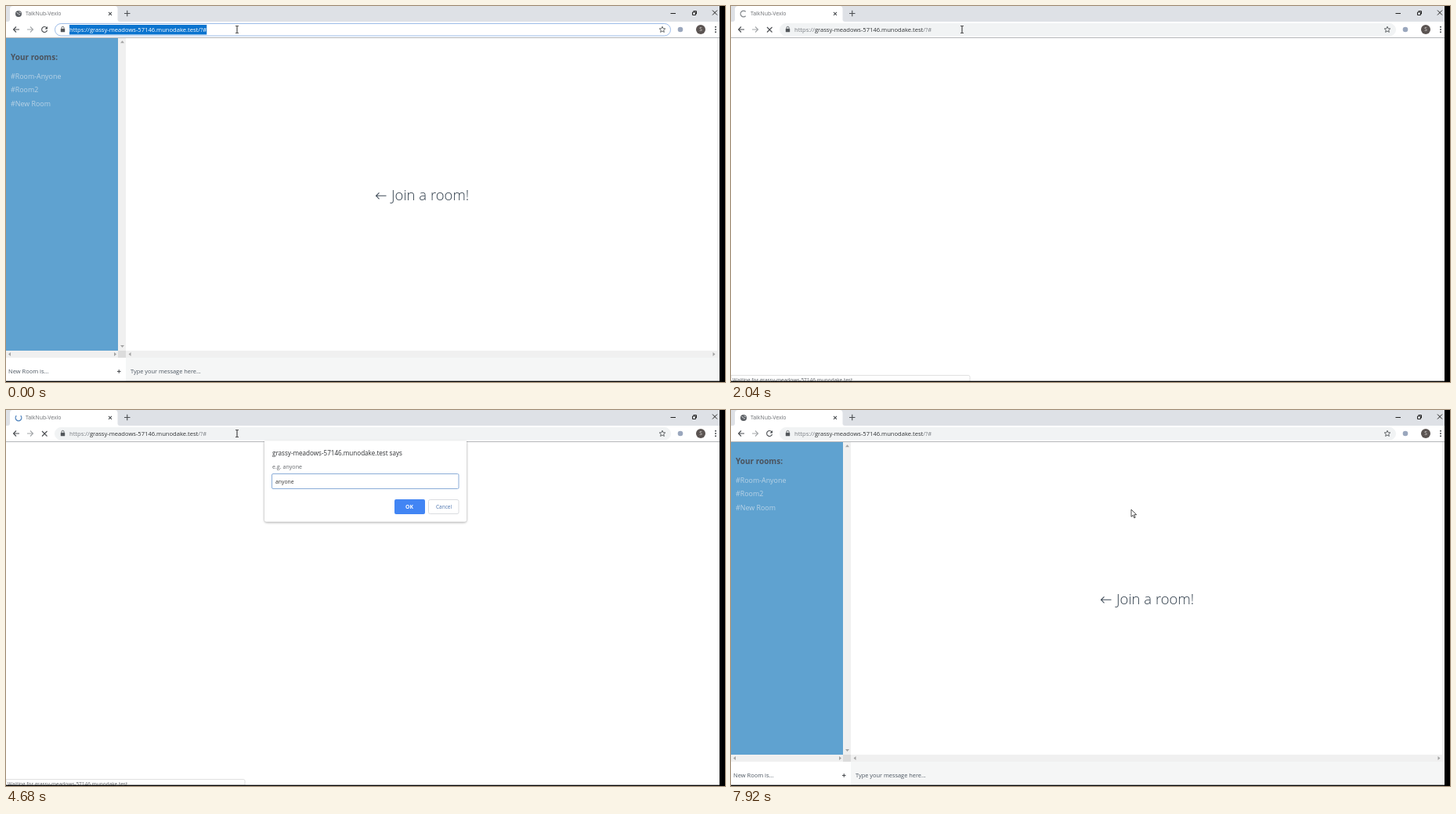
Recreate the animation shown at these times as an HTML page. Size 918 by 480 pixels, loop 8 s.

```html
<!DOCTYPE html>
<html lang="en">
<head>
<meta charset="utf-8">
<title>Chat room</title>
<style>
  html, body { margin: 0; width: 100%; height: 100%; overflow: hidden; background: #fff; }
  svg { display: block; width: 918px; height: 480px; }
  text { font-family: "Open Sans", "Noto Sans", sans-serif; white-space: pre; }
  .line { fill: none; stroke: #4b4e52; stroke-width: 1.1; }
  .thin { fill: none; stroke: #222; stroke-width: 1; }
</style>
</head>
<body>
<svg viewBox="0 0 918 480" xmlns="http://www.w3.org/2000/svg">
  <defs>
    <filter id="shade" x="-10%" y="-10%" width="120%" height="130%">
      <feDropShadow dx="0" dy="1" stdDeviation="1.5" flood-color="#000" flood-opacity=".4"/>
    </filter>
  </defs>
  <rect width="918" height="480" fill="#fff"/>

  <g id="page">
    <rect y="41" width="143" height="399" fill="#5fa2d0"/>
    <text x="6" y="69" font-size="10" font-weight="700" fill="#4b535e">Your rooms:</text>
    <g id="rooms" font-size="8.9" font-weight="500" fill="#b9d3e6">
      <text x="6" y="92.5">#Room-Anyone</text>
      <text x="6" y="110.3">#Room2</text>
      <text x="6" y="128.2">#New Room</text>
    </g>
    <rect x="143" y="41" width="10" height="399" fill="#f0f0f0"/>
    <rect y="440" width="911" height="9" fill="#f0f0f0"/>
    <rect x="143" y="440" width="10" height="9" fill="#dcdcdc"/>
    <rect x="908" y="41" width="3" height="408" fill="#f0f0f0"/>
    <path fill="#a3a3a3" d="M146 47.3h5l-2.5-3zM146 433h5l-2.5 3zM6 442v5l-3-2.500zM138 442v5l3-2.500zM159.500 442v5l-3-2.500zM902.500 442v5l3-2.500z"/>
    <rect x="153" y="449" width="758" height="30" fill="#f5f6f6"/>
    <text x="3" y="469" font-size="7.5" fill="#4c5661">New Room is...</text>
    <path class="line" d="M142 466.500h4.500M144.250 464.200v4.600" stroke-width=".9"/>
    <text x="159" y="469" font-size="7.4" fill="#4c5661">Type your message here...</text>
    <path class="line" d="M485.500 242.300H472.500M476.500 238.300l-4 4 4 4" style="stroke:#3f4b58"/>
    <text x="492" y="248" font-size="18.5" font-weight="300" fill="#33404d">Join a room!</text>
  </g>

  <g id="status">
    <path d="M0 471.500H303q2 0 2 2V479H0z" fill="#fff" stroke="#d8d8d8" stroke-width=".8"/>
    <text class="wait" x="2" y="480" font-size="6.5" fill="#62666b"></text>
  </g>

  <rect width="911" height="20" fill="#dee1e6"/>
  <path d="M2 20q3 0 3-3V4q0-4 4-4H139q3.500 0 3.500 4V17q0 3 3 3z" fill="#fff"/>
  <rect y="20" width="911" height="20" fill="#fff"/>
  <rect y="40" width="911" height="1" fill="#b4b6b9"/>
  <g id="globe">
    <circle cx="16" cy="10" r="4" fill="#5a5e63"/>
    <path d="M13.500 8.500q2 .2 2.500 2t2-.3M16.500 7q.5 1.500 2.500 1.500" fill="none" stroke="#e2e4e6" stroke-width=".9"/>
  </g>
  <path id="spin" d="M16 6.200A3.800 3.800 0 1 1 12.200 10" fill="none" stroke-width="1.300"/>
  <text x="25" y="12.400" font-size="6.900" fill="#6a6d71">TalkNub-Vexlo</text>
  <path class="line" d="M131 7.800l4 4M135 7.800l-4 4"/>
  <path class="line" d="M151 9.500h7.500M154.750 5.800v7.500"/>
  <path class="thin" d="M848.500 9.500h6.500M876.500 8v3.500h4V8zM877.800 7.500V6.500h3.700v3.500h-1M902 5.500l6 6M908 5.500l-6 6"/>

  <path class="line" d="M17 30H9.500M13 26.500L9.500 30l3.500 3.500"/>
  <path class="line" d="M27 30h7.500M31 26.500l3.500 3.500-3.500 3.500" style="stroke:#a4a7aa"/>
  <g id="reload">
    <path class="line" d="M52 28A3.500 3.500 0 1 0 52.500 31"/>
    <path d="M53 26v3.500h-3.500z" fill="#4b4e52"/>
  </g>
  <path id="stop" class="line" d="M46 27l6.500 6.500M52.500 27L46 33.500"/>
  <rect id="bar" x="62.500" y="22.500" width="786" height="15.500" rx="7.700"/>
  <rect x="69.800" y="29" width="5.400" height="4.300" rx=".5" fill="#53575b"/>
  <path d="M71 29v-1.200q0-1.500 1.500-1.500t1.500 1.500V29" fill="none" stroke="#53575b" stroke-width=".9"/>
  <rect id="mark" x="81" y="24" height="12.500" fill="#0b74cf"/>
  <text id="url" x="81" y="32.700" font-size="7.600"><tspan></tspan><tspan></tspan><tspan></tspan></text>
  <path id="star" fill="none" stroke="#53575b" stroke-width=".9"/>
  <circle cx="861" cy="30" r="3.300" fill="#9aa7bd"/>
  <circle cx="887" cy="30" r="6" fill="#5b5452"/>
  <text x="887" y="32.400" font-size="6.500" text-anchor="middle" fill="#e4e0dd">S</text>
  <g fill="#4b4e52"><circle cx="906" cy="26.800" r="1"/><circle cx="906" cy="30" r="1"/><circle cx="906" cy="33.200" r="1"/></g>

  <g id="dialog">
    <path d="M330 39.500H588V139.500q0 3-3 3H333q-3 0-3-3z" fill="#fff" filter="url(#shade)"/>
    <text class="says" x="340" y="58.300" font-size="8.100" fill="#303235"></text>
    <text x="340" y="74.500" font-size="7.100" fill="#65686c">e.g. anyone</text>
    <rect x="339.500" y="81.500" width="238.500" height="19" rx="1.500" fill="#fff" stroke="#8badd8"/>
    <text id="entry" x="344" y="93.500" font-size="6.800" fill="#333"></text>
    <rect id="ok" x="496" y="114" width="39" height="19" rx="2"/>
    <text x="515" y="126" font-size="6.800" font-weight="700" text-anchor="middle" fill="#fff">OK</text>
    <rect x="539.500" y="114.500" width="38.500" height="18" rx="2" fill="#fff" stroke="#dadce0"/>
    <text x="559" y="126" font-size="6.500" font-weight="500" text-anchor="middle" fill="#4a72ad">Cancel</text>
  </g>

  <path id="beam" d="M-1.800 -4.500h1.300l.5.500.5-.5h1.300M0 -4V4M-1.800 4.500h1.300l.5-.5.5.5h1.300" fill="none" stroke="#111" stroke-width=".9"/>
  <path id="arrow" d="M0 0V9.300L2.200 7.300 3.800 10.800 5.200 10.200 3.700 6.700H6.800z" fill="#fff" stroke="#222" stroke-width=".8"/>

  <rect y="478.700" width="918" height="1.300" fill="#000"/>
  <rect x="911" width="7" height="480" fill="#000"/>
</svg>
<script>
const LOOP = 8000, STEP = 120;
const LOAD = 720, BLANK = 2040, ASK = 2400, DONE = 6120, LIST = 6840;
const MOVE = [4920, 5640], FROM = [295, 30], TO = [511, 127];
const KEYS = [3240, 3480, 3720, 3840, 4080, 4200];
const host = "grassy-meadows-57146.munodake.test";

const $ = id => document.getElementById(id);
const show = (id, on) => { $(id).style.display = on ? "" : "none"; };
const set = (id, attrs) => { for (const k in attrs) $(id).setAttribute(k, attrs[k]); };
const within = (t, a, b) => t >= a && t < b;

const parts = $("url").children;
["https://", host, "/?#"].forEach((s, i) => { parts[i].textContent = s; });
document.querySelector(".wait").textContent = `Waiting for ${host}...`.replace("...", "");
document.querySelector(".says").textContent = host + " says";

const points = Array.from({ length: 10 }, (_, i) => {
  const a = -Math.PI / 2 + i * Math.PI / 5, r = i % 2 ? 1.8 : 4;
  return (838 + r * Math.cos(a)).toFixed(2) + " " + (30.2 + r * Math.sin(a)).toFixed(2);
});
set("star", { d: "M" + points.join("L") + "z" });

function drawUrl(picked) {
  const ink = picked ? ["#fff", "#fff", "#fff"] : ["#777b80", "#303336", "#777b80"];
  ink.forEach((c, i) => parts[i].setAttribute("fill", c));
  set("bar", { fill: picked ? "#fff" : "#f1f3f4", stroke: picked ? "#9cbce8" : "#f1f3f4" });
  show("mark", picked);
  if (picked) set("mark", { width: $("url").getComputedTextLength() });
}

function drawSpinner(t) {
  const blue = within(t, 1680, BLANK) || t >= ASK;
  let turn;
  if (!blue) turn = 45 - (t - BLANK) * 0.3;
  else if (t < BLANK) turn = (t - 1800) * 0.3;
  else turn = -45 + (t - 5880) * 0.3;
  // the gap of the arc starts out at the upper left
  set("spin", {
    stroke: blue ? "#4d82bd" : "#85898e",
    transform: `rotate(${turn + 90} 16 10)`
  });
}

function drawPointer(t) {
  const p = Math.min(1, Math.max(0, (t - MOVE[0]) / (MOVE[1] - MOVE[0])));
  const e = p * p * (3 - 2 * p);
  const [x, y] = FROM.map((v, i) => v + (TO[i] - v) * e);
  const typing = y < 38 || (within(y, 81, 101) && within(x, 339, 578));
  const hot = within(x, 496, 535) && within(y, 114, 133);
  show("beam", typing);
  show("arrow", !typing);
  set(typing ? "beam" : "arrow", { transform: `translate(${x} ${y})` });
  set("ok", { fill: hot ? "#4f8ef6" : "#4285f4" });
}

function draw(time) {
  const t = Math.floor(time / STEP) * STEP;
  const busy = within(t, LOAD, DONE);
  show("page", !within(t, BLANK, DONE));
  show("rooms", t < BLANK || t >= LIST);
  show("dialog", within(t, ASK, DONE));
  show("globe", !busy);
  show("reload", !busy);
  ["status", "spin", "stop"].forEach(id => show(id, busy));
  $("entry").textContent = "anyone".slice(0, KEYS.filter(k => t >= k).length);
  drawUrl(t < LOAD);
  drawSpinner(t);
  drawPointer(t);
}

const start = performance.now();
function tick() {
  draw((performance.now() - start) % LOOP);
  requestAnimationFrame(tick);
}
tick();
</script>
</body>
</html>
```
